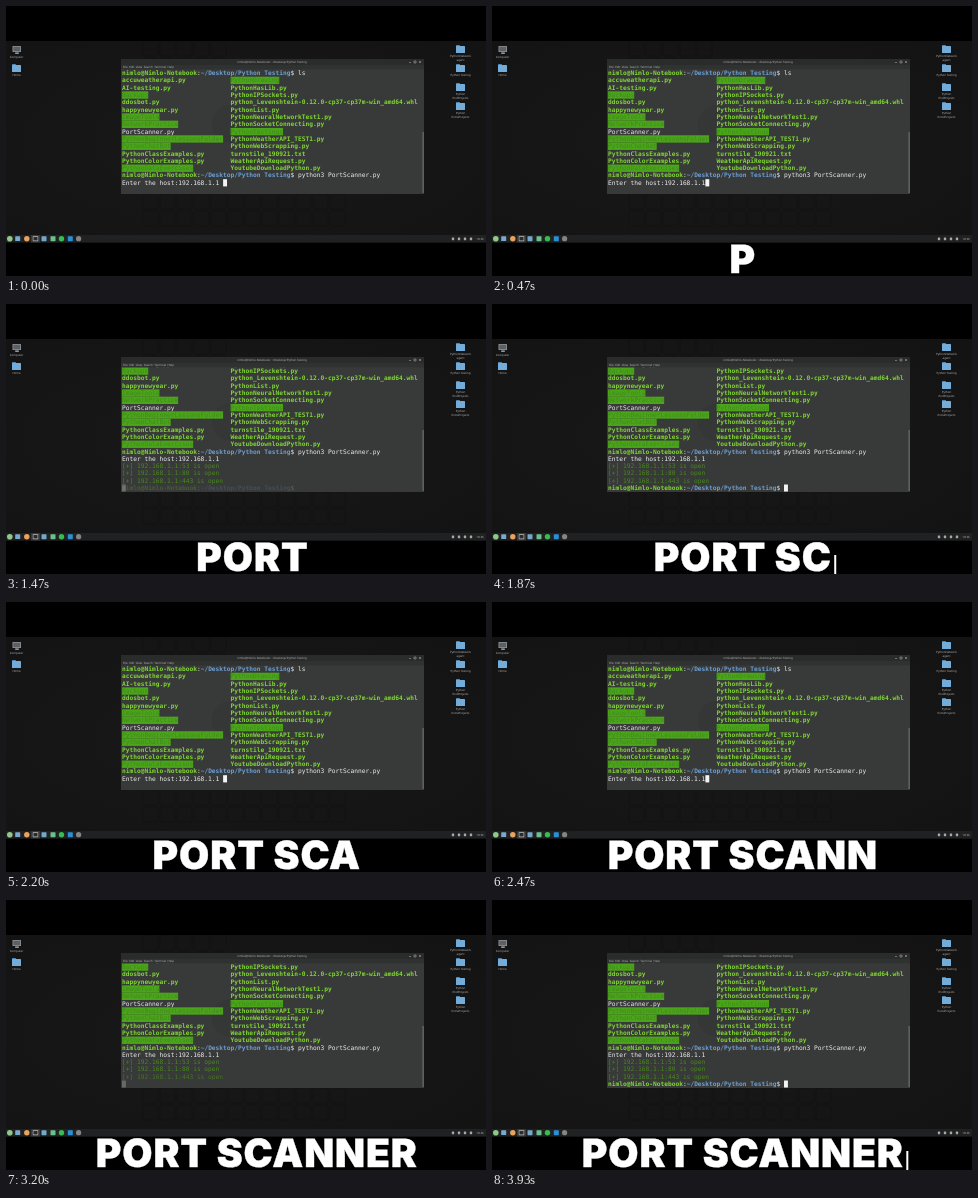
An HTML page that plays this animation: 480 by 270 pixels, repeating every 3990 ms.

```html
<!DOCTYPE html>
<html lang="en">
<head>
<meta charset="utf-8">
<title>Port scanner</title>
<style>
html, body { margin: 0; height: 100%; overflow: hidden; background: #000; }
svg { display: block; width: 100vw; height: 100vh; }
text { white-space: pre; text-rendering: geometricPrecision; fill: #ededed; }
.mono { font: 6.22px "DejaVu Sans Mono", monospace; }
.small { font: 2.9px "Noto Sans", sans-serif; fill: #b4b4b4; }
.mid { text-anchor: middle; }
.exe { font-weight: bold; fill: #7fd832; }
.path { font-weight: bold; fill: #6d9fd2; }
.dir { fill: #3f8a1a; }
.out { fill: #478a1c; }
#title { font: 900 39px Inter, sans-serif; letter-spacing: .9px; fill: #fff; stroke: #fff; stroke-width: .4; }
</style>
</head>
<body>
<svg viewBox="0 0 480 270">
  <defs>
    <radialGradient id="glow" cx=".45" cy=".5" r=".7">
      <stop offset="0" stop-color="#191919"/><stop offset="1" stop-color="#131313"/>
    </radialGradient>
    <pattern id="keys" width="17" height="17" patternUnits="userSpaceOnUse">
      <rect x="1" y="1" width="15" height="15" rx="1.5" fill="none" stroke="#000" stroke-opacity=".16"/>
    </pattern>
    <clipPath id="screen"><rect x="115" y="63.3" width="303" height="124.5"/></clipPath>
  </defs>
  <rect width="480" height="270"/>
  <rect y="35" width="480" height="201.5" fill="url(#glow)"/>
  <path d="M136 187h204v34h-204zM136 35h85v18h-85z" fill="url(#keys)"/>
  <g id="desk"></g>
  <g>
    <rect x="115" y="53" width="303" height="135" fill="#383939"/>
    <rect x="115" y="53" width="303" height="6" fill="#2a2b2b"/>
    <rect x="115" y="59" width="303" height="4.3" fill="#303131"/>
    <circle cx="225" cy="118" r="19" fill="#2f3030" opacity=".25"/>
    <text class="small mid" x="266" y="57">nimlo@Nimlo-Notebook: ~/Desktop/Python Testing</text>
    <text class="small" x="117" y="62.3">File  Edit  View  Search  Terminal  Help</text>
    <path d="M403 56.5h2M408 55h2v2h-2zM413 55l2 2m0-2l-2 2" fill="none" stroke="#b5b5b5" stroke-width=".5"/>
  </g>
  <g clip-path="url(#screen)">
    <g id="rows"></g>
    <rect id="cursor" width="3.9" height="7.2" fill="#f4f4f4"/>
  </g>
  <rect x="416.6" y="126" width="1" height="61" fill="#777"/>
  <text id="title" class="mid" x="250.8" y="267"></text>
  <rect id="bar" y="251" width="2" height="19" fill="#fff"/>
</svg>
<script>
const LOOP = 3990, RUN = LOOP / 2;
const LEFT = 116, TOP = 69, CHAR = 3.745, LINE = 7.32;
const TITLE = 'PORT SCANNER', TITLE_X = 250.8;
const $ = id => document.getElementById(id);
const colX = c => LEFT + c * CHAR;
const rowY = r => TOP + r * LINE;
const clamp = v => Math.max(0, Math.min(1, v));

// "#" marks a folder, "!" a plain file
const files = [
  ['accuweatherapi.py', '#PythonDrawing'],
  ['AI-testing.py', 'PythonHasLib.py'],
  ['#Backups', 'PythonIPSockets.py'],
  ['ddosbot.py', 'python_Levenshtein-0.12.0-cp37-cp37m-win_amd64.whl'],
  ['happynewyear.py', 'PythonList.py'],
  ['#ImageTools', 'PythonNeuralNetworkTest1.py'],
  ['#NetworkPractice', 'PythonSocketConnecting.py'],
  ['!PortScanner.py', '#PythonTestings'],
  ['#PythonBeginnerLessonsFolder', 'PythonWeatherAPI_TEST1.py'],
  ['#PythonChatBot', 'PythonWebScrapping.py'],
  ['PythonClassExamples.py', 'turnstile_190921.txt'],
  ['PythonColorExamples.py', 'WeatherApiRequest.py'],
  ['#PythonDataExercises', 'YoutubeDownloadPython.py']
];

const cell = (r, c, body, cls = '', id = '') =>
  `<text id="${id}" class="mono ${cls}" x="${colX(c)}" y="${rowY(r)}">${body}</text>`;

const prompt = (r, cmd, id) => cell(r, 0,
  '<tspan class="exe">nimlo@Nimlo-Notebook</tspan>:' +
  `<tspan class="path">~/Desktop/Python Testing</tspan>$ ${cmd}`, '', id);

function file(r, c, name) {
  if (name[0] === '!') return cell(r, c, name.slice(1));
  if (name[0] !== '#') return cell(r, c, name, 'exe');
  const label = name.slice(1);
  return `<rect x="${colX(c)}" y="${rowY(r) - 5.6}" width="${label.length * CHAR}" height="${LINE}" fill="#4ba51a"/>` +
    cell(r, c, label, 'dir');
}

$('rows').innerHTML = prompt(0, 'ls', 'list') +
  files.map(([a, b], i) => file(i + 1, 0, a) + file(i + 1, 29, b)).join('') +
  prompt(14, 'python3 PortScanner.py', 'command') +
  cell(15, 0, 'Enter the host:192.168.1.1') +
  [53, 80, 443].map((port, i) =>
    cell(16 + i, 0, `[+] 192.168.1.1:${port} is open`, 'out', 'port' + i)).join('') +
  prompt(19, '', 'done');

const box = (x, y, w, h, fill) =>
  `<rect x="${x}" y="${y}" width="${w}" height="${h}" rx=".6" fill="${fill}"/>`;
const dot = (x, r, fill) => `<circle cx="${x}" cy="232.7" r="${r}" fill="${fill}"/>`;
const label = (x, y, lines) => lines.map((s, i) =>
  `<text class="small mid" x="${x}" y="${y + i * 3.5}">${s}</text>`).join('');
const folder = (x, y, ...lines) =>
  box(x - 4.5, y - 4, 4, 3, '#4f88b8') + box(x - 4.5, y - 3, 9, 7, '#74acd9') + label(x, y + 8, lines);

$('desk').innerHTML =
  box(6.5, 40, 8.5, 6, '#8d9296') + box(7.3, 40.8, 6.9, 4.4, '#5b6064') + box(9, 46.5, 4, 1.2, '#b9bec2') +
  label(10.5, 52, ['Computer']) +
  folder(10.5, 62, 'Home') +
  folder(454.5, 43, 'PythonNetwork', 'agent') +
  folder(454.5, 62, 'Python Testing') +
  folder(454.5, 81, 'Python', 'EndProjects') +
  folder(454.5, 100, 'Python', 'ExtraProjects') +
  '<rect y="229" width="480" height="7.5" fill="#202122"/>' +
  box(25, 229, 9, 7.5, '#37393a') +
  dot(3.8, 2.8, '#8fc98a') + box(9.2, 230.3, 5, 4.8, '#79a9cc') + dot(20.8, 2.7, '#e9a35f') +
  box(26.8, 230.2, 5.4, 5, '#bdbdbd') + box(27.4, 230.9, 4.2, 3.6, '#2b2b2b') +
  box(35.5, 230.2, 5, 5, '#74a8c8') + box(44.5, 230.2, 5, 5, '#6cc08c') + dot(55.5, 2.7, '#35bd52') +
  box(61.8, 230.2, 5, 5, '#2b8fd6') + dot(72.6, 2.6, '#858585') +
  [447, 453, 459, 465].map(x => box(x - 1.2, 231.4, 2.4, 2.8, '#a8a8a8')).join('') +
  label(474, 233.8, ['10:36']);

function drawTerminal(p) {
  const scroll = p < 600 ? 0 : p < 670 ? 1 : p < 1130 ? 2 : 3;
  const ready = clamp((p - 1400) / 330);
  $('rows').setAttribute('transform', `translate(0 ${-scroll * LINE})`);
  $('port0').setAttribute('opacity', p < 600 ? 0 : 1);
  $('port1').setAttribute('opacity', p < 670 ? 0 : 1);
  $('port2').setAttribute('opacity', clamp((p - 600) / 800));
  $('done').setAttribute('opacity', ready);

  const typing = p < 540;
  const col = typing ? (p < 270 ? 27 : 26) : ready > .5 ? 47 : 0;
  $('cursor').setAttribute('x', colX(col));
  $('cursor').setAttribute('y', rowY(typing ? 15 : 16) - 5.6);
  $('cursor').setAttribute('opacity', typing ? 1 : ready > .5 ? ready : .25);
}

function drawTitle(t) {
  const title = $('title');
  title.textContent = TITLE.slice(0, Math.max(0, Math.floor((t - 170) / 230)));
  $('bar').setAttribute('x', TITLE_X + title.getComputedTextLength() / 2 + 2.5);
  $('bar').setAttribute('opacity', t % 1000 < 500 ? 0 : 1);
}

const start = performance.now();
function frame() {
  const t = (performance.now() - start) % LOOP;
  drawTerminal(t % RUN);
  drawTitle(t);
  requestAnimationFrame(frame);
}
frame();
</script>
</body>
</html>
```
